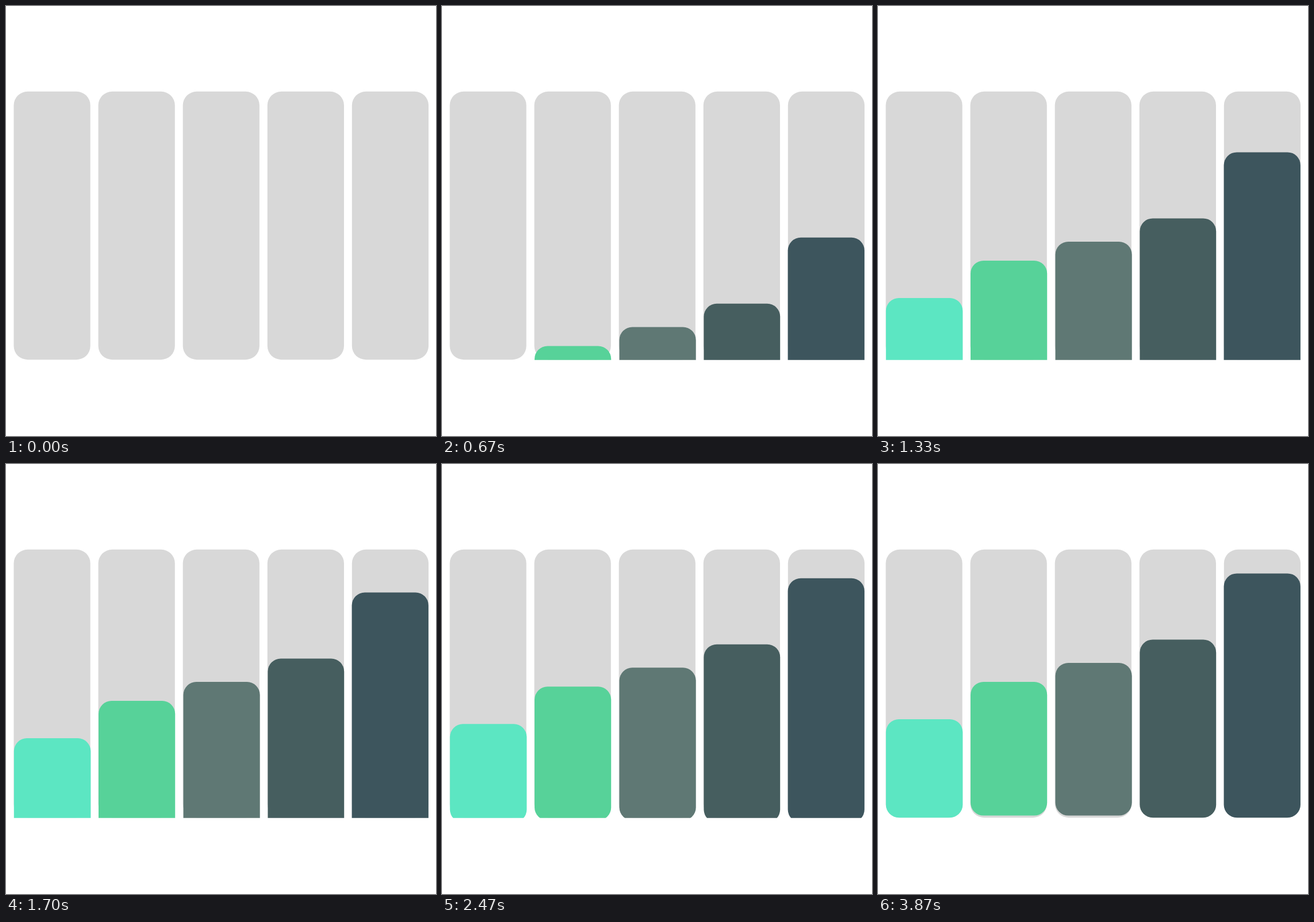
These frames come from a looping animation (748 px wide and 748 px high, 5010 ms). An HTML page:

```html
<!DOCTYPE html>
<html lang="en">
<head>
<meta charset="utf-8">
<title>Rising bars</title>
<style>
  html, body { margin: 0; width: 100%; height: 100%; overflow: hidden; background: #fff; }
  svg { display: block; width: 100%; height: 100%; }
</style>
</head>
<body>
<svg viewBox="0 0 748 748">
  <defs>
    <clipPath id="floor"><rect width="748" height="615.8"/></clipPath>
  </defs>
  <g id="tracks" fill="#d8d8d8"></g>
  <g clip-path="url(#floor)"><g id="bars"></g></g>
</svg>
<script>
  const LOOP = 5010, START = 300, END = 3870;
  const FRAME = 100 / 3;
  const RISE = 411, DECAY = 0.0018, HIDDEN = 500;

  // left, right, top, bottom, colour
  const BARS = [
    [13.8, 147.4, 444, 615.2, '#5ce6c2'],
    [161, 294.2, 379, 611.6, '#57d299'],
    [308.5, 441.7, 346, 611.6, '#5f7874'],
    [455.4, 588.2, 305.4, 615.2, '#465e5f'],
    [601.6, 734.9, 190.4, 615.2, '#3d555d']
  ];

  const tracks = document.getElementById('tracks');
  const bars = document.getElementById('bars');

  function addRect(parent, x, y, width, height, rx, fill) {
    const rect = document.createElementNS('http://www.w3.org/2000/svg', 'rect');
    const attrs = { x, y, width, height, rx };
    if (fill) attrs.fill = fill;
    for (const name in attrs) rect.setAttribute(name, attrs[name]);
    parent.appendChild(rect);
  }

  BARS.forEach(([left, right, top, bottom, fill], i) => {
    addRect(tracks, 13.5 + i * 147.08, 148.8, 133.2, 466.4, 24);
    addRect(bars, left, top, right - left, bottom - top, 22.5, fill);
  });

  // Distance of all bars below their resting place
  function offset(time) {
    if (time < START) return HIDDEN;
    if (time >= END) return 0;
    const held = Math.floor((time + 3.4) / FRAME) * FRAME;
    return RISE * Math.exp(-DECAY * (held - START));
  }

  function draw() {
    const y = offset(performance.now() % LOOP);
    bars.setAttribute('transform', `translate(0 ${y.toFixed(2)})`);
    requestAnimationFrame(draw);
  }
  draw();
</script>
</body>
</html>
```
